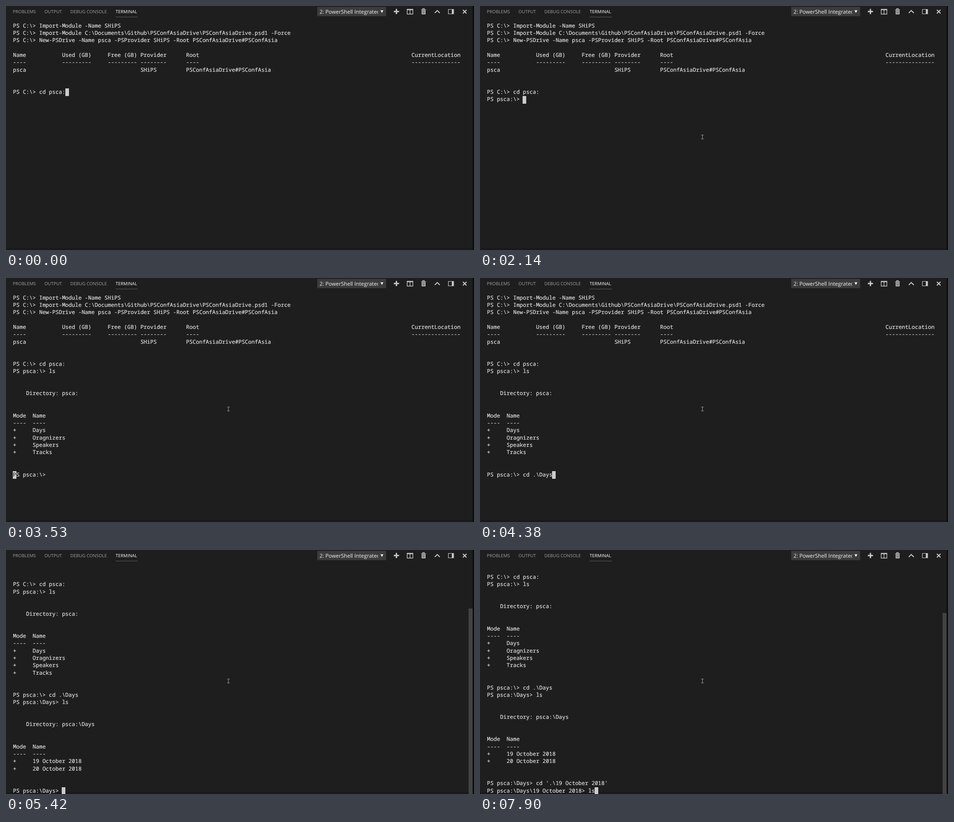
Animation, 1033 px wide and 542 px high, one loop 8000 ms. Source, as an HTML page:

```html
<!DOCTYPE html>
<html lang="en">
<head>
<meta charset="utf-8">
<title>Terminal</title>
<style>
  html, body { margin: 0; width: 100%; height: 100%; overflow: hidden; background: #1e1e1e; }
  body { position: relative; text-rendering: geometricPrecision; }
  body > * { position: absolute; margin: 0; }
  svg { left: 0; top: 0; }
  .ui { font-family: "Open Sans", sans-serif; }
  #screen, #cursor { font: 12.028px/16.375px "Noto Sans Mono", monospace; white-space: pre; }
  #screen { left: 15.5px; top: 35.6px; color: #e4e4e4; -webkit-text-stroke: .2px #e4e4e4; }
  #cursor { width: 8px; height: 17px; background: #ccc; color: #1e1e1e; }
  #thumb { left: 1021px; width: 9px; bottom: 0; background: #424242; }
</style>
</head>
<body>
<svg width="1033" height="542" viewBox="0 0 1033 542">
  <path d="M0 538h1033v4H0z" fill="#191919"/>
  <path d="M1030 0h3v542h-3z" fill="#0c0c0c"/>
  <g class="ui" font-size="9.85" fill="#a0a0a0">
    <text x="15" y="15.5">PROBLEMS</text>
    <text x="84.7" y="15.5">OUTPUT</text>
    <text x="142" y="15.5">DEBUG CONSOLE</text>
    <text x="242" y="15.5" fill="#fff">TERMINAL</text>
  </g>
  <path d="M242 24.5h49" stroke="#5c5c5c"/>
  <path d="M687 2h152v20.5h-152z" fill="#3c3c3c"/>
  <clipPath id="label"><path d="M687 2h134.5v21h-134.5z"/></clipPath>
  <text class="ui" x="692" y="16.5" font-size="11.8" fill="#f4f4f4" clip-path="url(#label)">2: PowerShell Integrated</text>
  <path d="M826.5 9.5h6.500l-3.250 6z" fill="#f0f0f0"/>
  <g fill="none" stroke="#c8c8c8">
    <path d="M856 12.3h11.500M861.750 6.500v11.500" stroke-width="3"/>
    <path d="M885.500 7.500h12.500v10.500h-12.500zM891.750 8v10" stroke-width="1.400"/>
    <path d="M885 8h13.500" stroke-width="2.500"/>
    <path d="M916.5 8.500h10.500M919.500 7.500v-1.500h4v1.500" stroke-width="1.500"/>
    <path d="M917.5 10h8.500v8.500h-8.500z" fill="#c8c8c8" stroke="none"/>
    <path d="M919.750 11v6M921.750 11v6M923.750 11v6" stroke="#1e1e1e" stroke-width=".8"/>
    <path d="M946.500 15.500l5.500-5.500 5.500 5.500" stroke-width="2"/>
    <path d="M976.500 7.500h11.500v10h-11.500z" stroke-width="1.200"/>
    <path d="M986 7v11" stroke-width="4"/>
    <path d="M1008.500 8.500l8 8M1016.500 8.500l-8 8" stroke-width="2.200"/>
  </g>
</svg>
<pre id="screen"></pre>
<div id="cursor"></div>
<div id="thumb"></div>
<svg width="1033" height="542">
  <path id="pointer" d="M-2.500-4.500h2l.5.500.5-.500h2M0-4v8M-2.500 4.500h2l.5-.500.5.500h2" fill="none" stroke="#b4b4b4"/>
</svg>
<script>
const LOOP = 8000, ROWS = 31, TOP = 36, LEFT = 15.5, ROW_H = 16.375, COL_W = 7.217;
const $ = id => document.getElementById(id);

const widths = [15, 14, 10, 14, 69, 0];
const row = (...cells) => cells.map((c, i) => c.padEnd(widths[i])).join('') + '\n';
const dir = (path, names) => `\n\n    Directory: ${path}\n\n` + names;
const list = (...names) => '\nMode  Name\n----  ----\n' + names.map(n => '+     ' + n + '\n').join('') + '\n\n';

const intro = 'PS C:\\> Import-Module -Name SHiPS\n' +
  'PS C:\\> Import-Module C:\\Documents\\Github\\PSConfAsiaDrive\\PSConfAsiaDrive.psd1 -Force\n' +
  'PS C:\\> New-PSDrive -Name psca -PSProvider SHiPS -Root PSConfAsiaDrive#PSConfAsia\n\n' +
  row('Name', 'Used (GB)', 'Free (GB)', 'Provider', 'Root', 'CurrentLocation') +
  row('----', '---------', '---------', '--------', '----', '---------------') +
  row('psca', '', '', 'SHiPS', 'PSConfAsiaDrive#PSConfAsia', '') +
  '\n\nPS C:\\> cd psca:';

// [time, appended text, characters erased first]; a final \r parks the cursor at column 0
const events = [
  [0, intro],
  [2140, '\nPS psca:\\> '],
  [3060, 'l'], [3140, 's'], [3220, '\n'],
  [3450, dir('psca:', list('Days', 'Oragnizers', 'Speakers', 'Tracks'))],
  [3530, 'PS psca:\\> \r'], [3610, '', 1],
  [3830, 'c'], [3910, 'd'], [3980, ' '],
  [4300, 'D'], [4380, '.\\Days', 1],
  [4710, '\n'], [4780, 'PS psca:\\Days> '],
  [4950, 'l'], [5020, 's'],
  [5180, '\n'], [5240, dir('psca:\\Days', '')],
  [5420, list('19 October 2018', '20 October 2018') + 'PS psca:\\Days> '],
  [6110, 'c'], [6190, 'd'], [6260, ' '],
  [6510, '1'], [6660, '9'], [6800, "'.\\19 October 2018'", 2],
  [7360, '\nPS psca:\\Days\\19 October 2018> '],
  [7730, 'l'], [7900, 's']
];
const moves = [[70, 626, 404], [150, 566, 352], [500, 540, 331], [580, 508, 305], [650, 491, 291]];

function draw(t) {
  let text = '';
  for (const [at, add, erase = 0] of events)
    if (at <= t) text = text.slice(0, text.length - erase) + add;

  const parked = text.endsWith('\r');
  const lines = text.replace('\r', '').split('\n');
  const scroll = Math.max(0, lines.length - ROWS);
  const last = lines[lines.length - 1];
  const col = parked ? 0 : last.length;

  $('screen').textContent = lines.slice(scroll).join('\n');
  $('cursor').textContent = last[col] || '';
  $('cursor').style.left = Math.floor(LEFT + col * COL_W + 0.1) + 'px';
  $('cursor').style.top = Math.round(TOP + (lines.length - 1 - scroll) * ROW_H) + 'px';

  $('thumb').style.display = scroll ? '' : 'none';
  $('thumb').style.top = Math.round(TOP + 508 * scroll / lines.length) + 'px';

  const spot = moves.filter(m => m[0] <= t).pop();
  $('pointer').style.display = spot ? '' : 'none';
  if (spot) $('pointer').setAttribute('transform', `translate(${spot[1]} ${spot[2]})`);
}

const start = performance.now();
function tick() {
  draw((performance.now() - start) % LOOP);
  requestAnimationFrame(tick);
}
tick();
</script>
</body>
</html>
```
